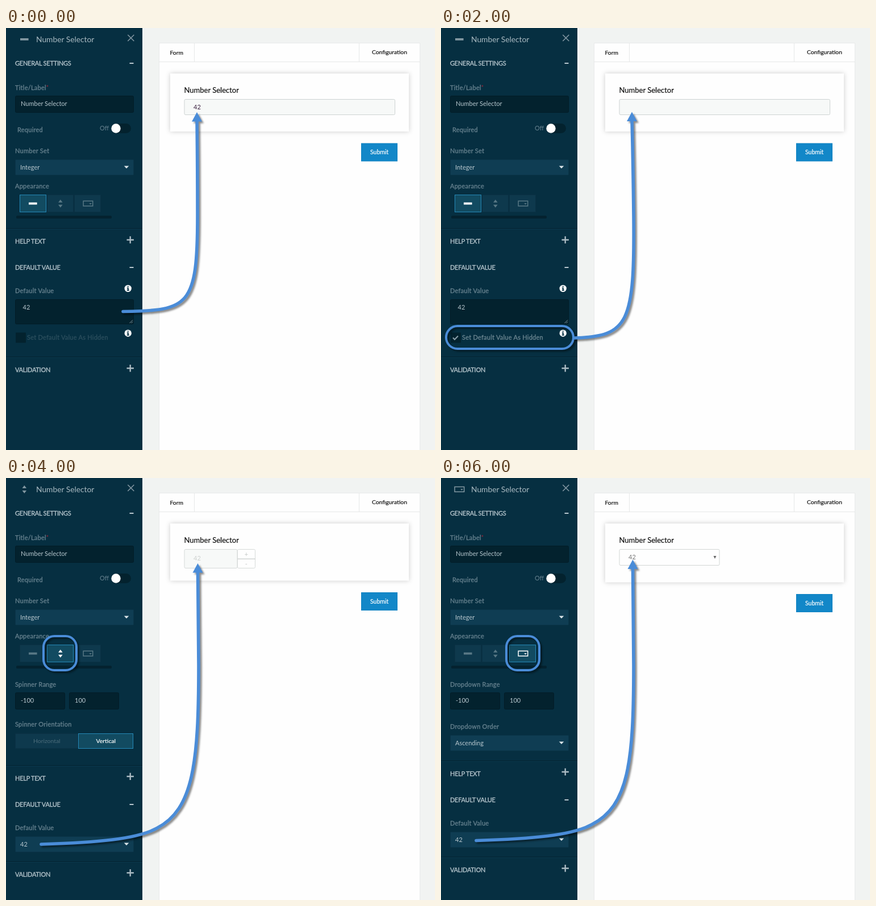
An HTML page that plays this animation: 755x742 px, repeating every 8000 ms.

```html
<!DOCTYPE html>
<html lang="en">
<head>
<meta charset="utf-8">
<title>Number Selector</title>
<style>
  html, body { margin: 0; width: 100%; height: 100%; overflow: hidden; background: #f1f3f2; }
  svg { display: block; width: 100%; height: 100%; }
  text { font: 11px Lato, "Open Sans", sans-serif; white-space: pre; }
  .label { letter-spacing: .25px; stroke-width: .3px; }
  .head { letter-spacing: -.25px; stroke-width: .3px; }
  .medium { stroke-width: .2px; }
  .mark { fill: none; stroke: #4a8cd8; filter: drop-shadow(3px 3px 1.5px rgba(0,0,0,.45)); }
  .card { filter: drop-shadow(0 0 4px rgba(0,0,0,.2)); }
</style>
</head>
<body>
<svg id="stage" viewBox="0 0 755 742"></svg>
<script>
const DIM = '#688390', PALE = '#b9c8cf', DARK = '#03222e', FIELD = '#0f3d53', BLUE = '#4a8cd8';

// Basic shapes; text is placed by the vertical centre of its capitals
const rect = (x, y, w, h, fill, more = '') =>
  `<rect x="${x}" y="${y}" width="${w}" height="${h}" fill="${fill}" ${more}/>`;
const box = (x, y, w, h, fill, line, rx = 0) =>
  rect(x + .5, y + .5, w - 1, h - 1, fill, `stroke="${line}" rx="${rx}"`);
const path = (d, fill, more = '') => `<path d="${d}" fill="${fill}" ${more}/>`;
const line = (d, color, width) => path(d, 'none', `stroke="${color}" stroke-width="${width}"`);
const text = (s, x, y, color, size = 11, cls = '') =>
  `<text x="${x}" y="${y + size * .36}" fill="${color}" class="${cls}"
    style="font-size:${size}px" ${cls ? `stroke="${color}"` : ''}>${s}</text>`;

const label = (s, y, color = DIM, x = 16) => text(s, x, y, color, 11, 'label');
const divider = y => rect(0, y, 240, 1, '#03212e') + rect(0, y + 1, 240, 1, '#0a3a4f');
const field = (s, x, y, w) => box(x, y, w, 30, DARK, '#021c27', 2) + text(s, x + 10, y + 14.5, PALE);
const select = (s, y) => box(16, y, 209, 28, FIELD, '#0a3448', 1) +
  text(s, 25, y + 13.8, PALE) + path(`M207.7 ${y + 11.5}h8.6l-4.3 4.5z`, '#dbe5e9');
const info = y => `<circle cx="214.7" cy="${y}" r="6.2" fill="#f4f7f8"/>` +
  path(`M213 ${y - 1.4}h2.8v4h1v1.4h-4v-1.4h1v-2.6h-.8zM213.7 ${y - 4.2}h2v1.8h-2z`, '#062f41');

function section(s, y, open) {
  const sign = open ? rect(217.5, Math.round(y) - 1, 7, 2, PALE)
    : line(`M212.5 ${y - 3}h12.4M218.7 ${y - 9.2}v12.4`, '#aabac2', 2.4);
  return text(s, 16, y, PALE, 11, 'head') + sign;
}

const icons = [
  (x, y, c) => rect(x - 7.3, y - 1.8, 14.6, 3.8, c),
  (x, y, c) => path(`M${x - 3.8} ${y - 1.8}h7.6l-3.8 -5zM${x - 3.8} ${y + 2.2}h7.6l-3.8 5z`, c),
  (x, y, c) => rect(x - 8.2, y - 4.3, 16.6, 8.8, 'none', `stroke="${c}" stroke-width="1.5"`) +
    path(`M${x + 2} ${y - .6}h4.6l-2.3 2.6z`, c)
];

function appearance(active) {
  return icons.map((icon, i) => {
    const on = i === active;
    return box(24 + 48 * i, 293, 47, 31, on ? '#124b61' : '#0e394d', on ? '#2589b8' : '#0b3144') +
      icon(47.3 + 48.5 * i, 308.5, on ? '#fff' : '#587885');
  }).join('');
}

const arrow = (d, x, y) => `<g class="mark">` +
  path(d, 'none', 'stroke-width="5.6" stroke-linecap="round"') +
  path(`M${x} ${y}l9 16.5h-18z`, BLUE, 'stroke="none"') + '</g>';
const ring = (x, y, w, h, rx) =>
  rect(x, y, w, h, 'none', `rx="${rx}" class="mark" stroke-width="4"`);

function sidebar(active) {
  return rect(0, 0, 240, 742, '#062f41') +
    icons[active](32.3, 19.8, '#8297a1') + text('Number Selector', 53, 19.6, '#a9bac2', 13.8) +
    line('M214.3 12l11 11m0 -11l-11 11', '#8095a0', 1.7) +
    section('GENERAL SETTINGS', 62, true) +
    label('Title/Label', 105) + text('*', 70.5, 105, '#a32638', 11) +
    field('Number Selector', 16, 119, 209) +
    label('Required', 179, DIM, 20) + text('Off', 165, 176.3, DIM) +
    rect(185, 168, 35, 17, DARK, 'rx="8.5"') + '<circle cx="193.5" cy="176.5" r="8.2" fill="#fff"/>' +
    label('Number Set', 216) + select('Integer', 231) +
    label('Appearance', 278) + appearance(active) + rect(18, 330, 168, 5, '#04222f', 'rx="2"');
}

function preview(control, bottom) {
  return rect(240, 0, 515, 742, '#f1f3f2') + box(269, 26, 460, 730, '#fefefe', '#e8eaea') +
    line('M269 59.5h460M331.5 27v32M621.5 27v32', '#e6e8e8', 1) +
    text('Form', 288.5, 43.3, '#111', 10.3, 'medium') +
    text('Configuration', 644, 42.6, '#111', 10.3, 'medium') +
    rect(289, 80, 420, bottom - 80, '#fefefe', 'class="card"') +
    text('Number Selector', 313.5, 109, '#111', 13, 'medium') + control +
    box(625, bottom + 20.5, 64, 32, '#1287c8', '#0f82c2') +
    text('Submit', 641, bottom + 36.3, '#fff', 10.5, 'medium');
}

// Lower panel of the plain input look
function plain(hidden) {
  return divider(352) + section('HELP TEXT', 375.5) + section('DEFAULT VALUE', 421.3, true) +
    label('Default Value', 462.5) + info(458) +
    box(16, 477, 209, 44, DARK, '#021c27', 2) + text('42', 29.5, 491.3, PALE) +
    line('M217.5 519l5.5 -5.5m-2.5 5.5l2.5 -2.5', '#8a9aa2', 1) +
    rect(17, 535.5, 18, 18, DARK, 'rx="1"') +
    (hidden ? line('M21 544.5l3 3.2l6 -6.2', '#8ba0aa', 2) : '') +
    label('Set Default Value As Hidden', 544.5, hidden ? '#6d8792' : '#2c4f5e', 37) + info(536.7) +
    divider(578) + section('VALIDATION', 601.3);
}

// Lower panel of the spinner and dropdown looks
function ranged(title, y, extra) {
  return label(title, 363) + field('-100', 16, 377, 88) + field('100', 111, 377, 88) + extra +
    divider(y) + section('HELP TEXT', y + 22.8) + section('DEFAULT VALUE', y + 68.8, true) +
    label('Default Value', y + 110) + select('42', y + 125) +
    divider(y + 169) + section('VALIDATION', y + 192.3);
}

const input = box(313.5, 125, 371.5, 28, '#f7f9f8', '#cdd3d2', 2);
const spinner = box(313.5, 125, 94, 34, '#f7f9f8', '#d6dad9', 2) + text('42', 330, 141.5, '#cdd0cf') +
  box(407, 125, 32, 34, '#fefefe', '#d6dad9', 2) + line('M407 142.3h32', '#d0d4d3', 1.5) +
  text('+', 419.7, 134, '#c3c7c6') + text('-', 420.7, 151, '#c3c7c6');
const dropdown = box(313.5, 125, 177, 29, '#fefefe', '#d2d6d5', 2) + text('42', 330, 139.5, '#777') +
  path('M479.5 137h5l-2.5 5z', '#666');
const orientation = label('Spinner Orientation', 433.5) +
  box(16, 449, 111, 27, '#0e394d', '#0b3144') + text('Horizontal', 48, 462.5, '#4d6e7c', 10.4) +
  box(127, 449, 97, 27, '#124b61', '#2589b8') + text('Vertical', 158.5, 462.5, '#fff', 10.4, 'medium');
const order = label('Dropdown Order', 437.5) + select('Ascending', 452);

const sweep = (y, tip) => arrow(`M62 ${y}C160 ${y - 3} 230 ${y - 9} 265 ${y - 28}
  C330 ${y - 61} 339 500 339 330Q338.5 240 337.5 ${tip + 14}`, 337.5, tip);

const scenes = [
  preview(input + text('42', 330, 139.3, '#3b2140'), 182) + sidebar(0) + plain(false) +
    arrow('M206 498.5C322 497 337 490 337 330Q337 240 336 162', 336, 148),
  preview(input, 182) + sidebar(0) + plain(true) + ring(9, 524, 224, 40, 20) +
    arrow('M235 545C330 542 341 520 339 330Q338 240 336 162', 336, 147.5),
  preview(spinner, 180.5) + sidebar(1) + ranged('Spinner Range', 505, orientation) +
    ring(66, 278, 58, 60, 19) + sweep(644, 150),
  preview(dropdown, 183.5) + sidebar(2) + ranged('Dropdown Range', 497, order) +
    ring(115, 278, 58, 60, 19) + sweep(637.5, 143.5)
];

const stage = document.getElementById('stage');
let shown = -1;
function tick() {
  const now = Math.floor(performance.now() % 8000 / 2000);
  if (now !== shown) stage.innerHTML = scenes[shown = now];
  requestAnimationFrame(tick);
}
tick();
</script>
</body>
</html>
```
